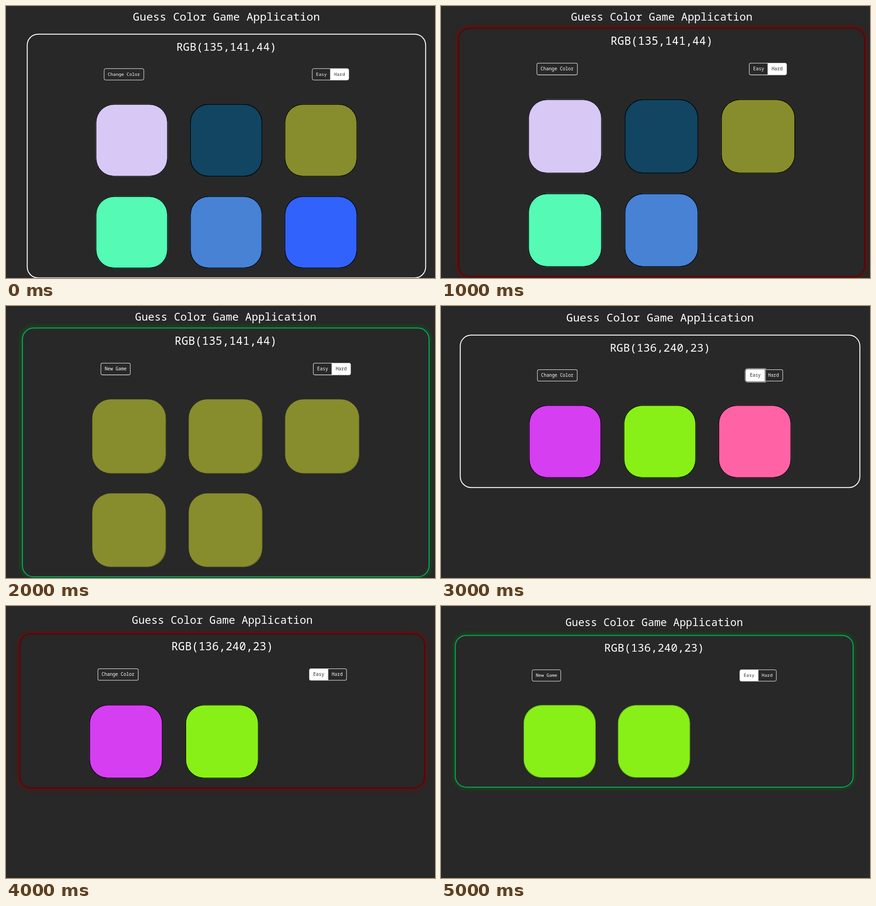
An HTML page for the animation above (6000 ms loop, 940 by 596 pixels).

```html
<!DOCTYPE html>
<html lang="en">
<head>
<meta charset="utf-8">
<title>Guess Color Game</title>
<style>
  html, body { margin: 0; width: 100%; height: 100%; overflow: hidden; background: #282828; }
  body { position: relative; color: #fff; font: 500 10px "Noto Sans Mono", monospace; }
  div { position: absolute; box-sizing: border-box; white-space: pre; }
  #game { left: 0; top: 0; width: 873px; transform-origin: 0 0; }

  .frame { left: -1px; top: -1px; width: 875px; border: 2px solid #fff; border-radius: 25px; }
  .wrong .frame { border-color: #640000; box-shadow: 0 0 10px 1px rgba(139, 0, 0, .75), inset 0 0 3px #640000; }
  .right .frame { border-color: #00b062; box-shadow: 0 0 10px 2px rgba(0, 128, 0, .5); }

  .line { left: 0; width: 100%; text-align: center; font-size: 24.4px; line-height: 30px; }
  .wrong .title, .right .title { font-size: 23.2px; }
  .goal { top: 12.2px; }

  .buttons { top: 75.4px; display: flex; font-size: 9.82px; line-height: 23.6px; }
  .buttons span { padding: 0 7.6px; border: 1px solid #f8f9fa; border-radius: 4px; }
  .toggle span:first-child { border-radius: 4px 0 0 4px; }
  .toggle span:last-child { border-radius: 0 4px 4px 0; margin-left: -1px; }
  .buttons .active { background: #fff; color: #212529; }
  .buttons .focus { box-shadow: 0 0 0 2.7px #8f8f8f; z-index: 1; }

  .tile { width: 158.5px; height: 158.5px; border-radius: 40px; }
</style>
</head>
<body>
<div id="game"></div>
<script>
const SCENE_MS = 1000;
const OLIVE = "#878d2c", LIME = "#88f017", ORCHID = "#d63ef1";
const HARD = ["#d8c8f6", "#114562", OLIVE, "#55fab4", "#4782d5", "#3262fc"];
const EASY = [ORCHID, LIME, "#ff63a5"];
const hard = { goal: "RGB(135,141,44)", level: "Hard", height: 536 };
const easy = { goal: "RGB(136,240,23)", level: "Easy", height: 335 };

// x, y: upper left corner of the panel; title: baseline relative to the panel;
// edge: inset shadow that outlines a tile
const scenes = [
  { ...hard, x: 46.5, y: 61.7, scale: 1, title: -29.5, tiles: HARD },
  { ...hard, x: 38.1, y: 48.3, scale: 1.0206, title: -15.7, tiles: HARD.slice(0, 5), state: "wrong" },
  { ...hard, x: 36, y: 48.3, scale: 1.0206, title: -15.2, tiles: Array(5).fill(OLIVE), state: "right", edge: "-1.3px -1.3px #6c7124" },
  { ...easy, x: 42.2, y: 63.8, scale: 1.003, title: -29.6, tiles: EASY, focus: true },
  { ...easy, x: 30.1, y: 60.7, scale: 1.0165, title: -20.2, tiles: EASY.slice(0, 2), state: "wrong" },
  { ...easy, x: 31.3, y: 64.4, scale: 0.9985, title: -19.8, tiles: [LIME, LIME], state: "right", edge: "0 0 0 1.3px #6abb14" }
];

const game = document.getElementById("game");

function tileMarkup(color, i, edge) {
  const left = 149.6 + (i % 3) * 207.2;
  const top = 153.1 + Math.floor(i / 3) * 201.4;
  return `<div class="tile" style="left:${left}px;top:${top}px;background:${color};box-shadow:inset ${edge}"></div>`;
}

function levelMarkup(name, scene) {
  const active = name === scene.level;
  const style = active ? (scene.focus ? "active focus" : "active") : "";
  return `<span class="${style}">${name}</span>`;
}

function render(scene) {
  const { x, y, scale, state = "", edge = "0 0 0 1.5px #000" } = scene;
  game.className = state;
  game.style.transform = `translate(${x}px, ${y}px) scale(${scale})`;
  game.innerHTML = `
    <div class="line title" style="top:${scene.title - 24.4}px">Guess Color Game Application</div>
    <div class="frame" style="height:${scene.height}px"></div>
    <div class="line goal">${scene.goal}</div>
    <div class="buttons" style="left:168px"><span>${state === "right" ? "New Game" : "Change Color"}</span></div>
    <div class="buttons toggle" style="left:624.2px">${["Easy", "Hard"].map(name => levelMarkup(name, scene)).join("")}</div>
    ${scene.tiles.map((color, i) => tileMarkup(color, i, edge)).join("")}`;
}

let shown = -1;
const start = performance.now();

function tick() {
  const index = Math.floor((performance.now() - start) / SCENE_MS) % scenes.length;
  if (index !== shown) render(scenes[shown = index]);
  requestAnimationFrame(tick);
}
tick();
</script>
</body>
</html>
```
